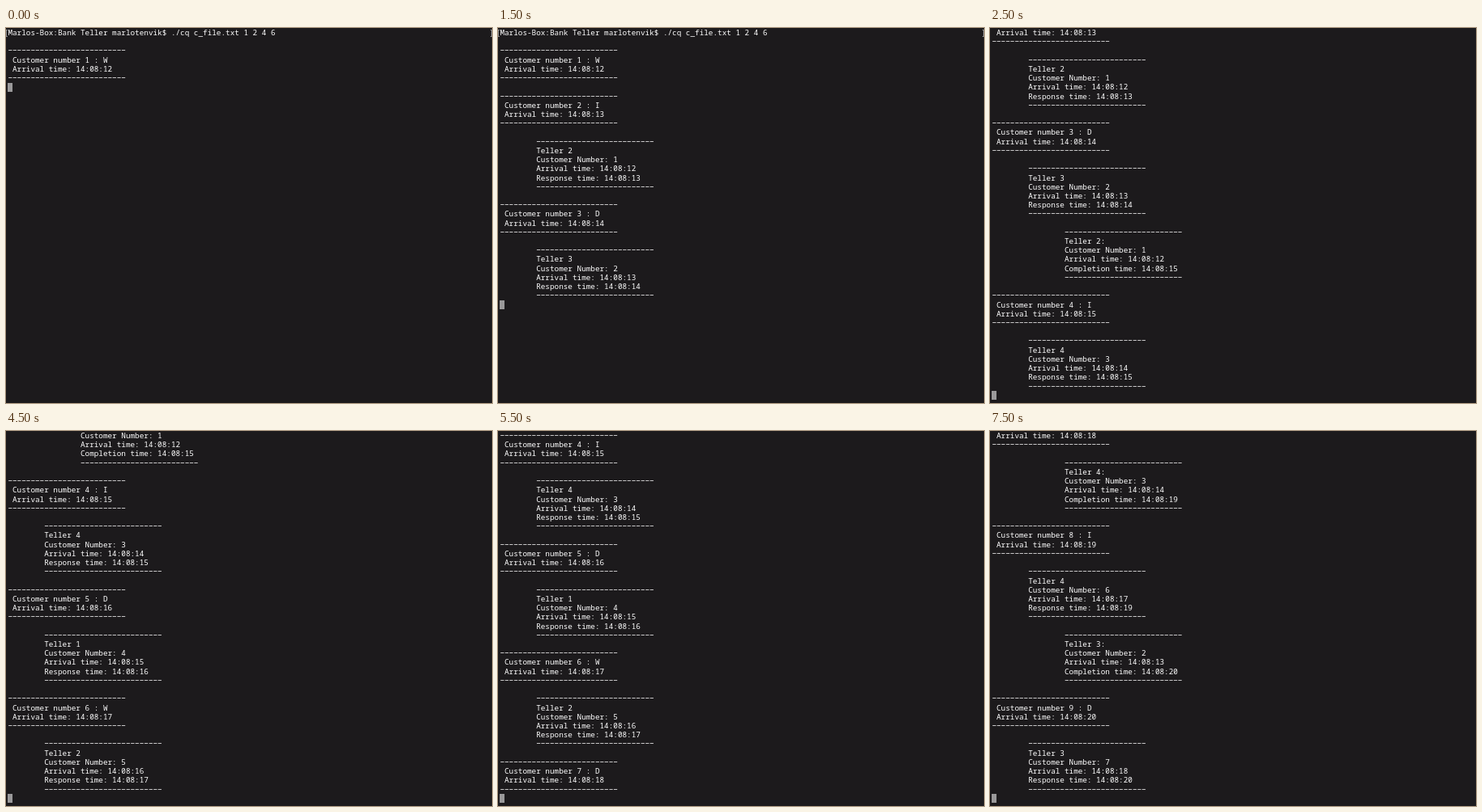
Animation of 600x464 px, one loop 8000 ms. Source, as an HTML page:

```html
<!DOCTYPE html>
<html lang="en">
<head>
<meta charset="utf-8">
<title>Teller queue</title>
<style>
  html, body { margin: 0; width: 100%; height: 100%; overflow: hidden; background: #1c1a1c; }
  pre {
    position: absolute; left: 2.4px; top: 0; margin: 0; color: #fff;
    font: 500 9.333px/11.22px "Noto Sans Mono", monospace;
    font-variant-ligatures: none;
  }
  #cursor { position: absolute; left: 2.4px; width: 5.6px; height: 11.22px; background: #9a999a; }
  .mark { position: absolute; top: 2px; width: 1px; height: 7px; border: 1px solid #8c8b8c; }
  .open { left: 0; border-right: 0; }
  .close { left: 598px; border-left: 0; }
</style>
</head>
<body>
<i class="mark open"></i><i class="mark close"></i>
<pre id="screen"></pre>
<div id="cursor"></div>
<script>
const ROWS = 41, ROW_HEIGHT = 11.22, LOOP = 8000;
const rule = "−".repeat(26);
const kinds = "WIDIDWDID";
const clock = second => "14:08:" + second;
const arrival = n => "Arrival time: " + clock(11 + n);

const block = (indent, lines) =>
  ["", ...[rule, ...lines, rule].map(line => " ".repeat(indent) + line)];

const arrive = n => block(0, [` Customer number ${n} : ${kinds[n - 1]}`, " " + arrival(n)]);
const respond = (teller, n, second) => block(8, [
  "Teller " + teller, "Customer Number: " + n, arrival(n), "Response time: " + clock(second)]);
const complete = (teller, n, second) => block(16, [
  `Teller ${teller}:`, "Customer Number: " + n, arrival(n), "Completion time: " + clock(second)]);

// Output printed at each tick
const ticks = [
  [arrive(1)],
  [arrive(2), respond(2, 1, 13)],
  [arrive(3), respond(3, 2, 14)],
  [complete(2, 1, 15), arrive(4), respond(4, 3, 15)],
  [arrive(5), respond(1, 4, 16)],
  [arrive(6), respond(2, 5, 17)],
  [arrive(7)],
  [complete(4, 3, 19), arrive(8), respond(4, 6, 19)],
  [complete(3, 2, 20), arrive(9), respond(3, 7, 20)]
];
const prompt = "Marlos-Box:Bank Teller marlotenvik$ ./cq c_file.txt 1 2 4 6";

const screen = document.getElementById("screen");
const cursor = document.getElementById("cursor");
const marks = document.querySelectorAll(".mark");
let shown = -1;

function show(tick) {
  const lines = [prompt, ...ticks.slice(0, tick + 1).flat(2)];
  const top = Math.max(0, lines.length + 1 - ROWS);
  screen.textContent = lines.slice(top).join("\n");
  cursor.style.top = 0.3 + (lines.length - top) * ROW_HEIGHT + "px";
  marks.forEach(mark => mark.hidden = top > 0);
  marks.forEach(mark => mark.style.display = top > 0 ? "none" : "block");
  shown = tick;
}

function draw() {
  const tick = Math.floor((performance.now() % LOOP + 500) / 1000);
  if (tick !== shown) show(tick);
  requestAnimationFrame(draw);
}
draw();
</script>
</body>
</html>
```
